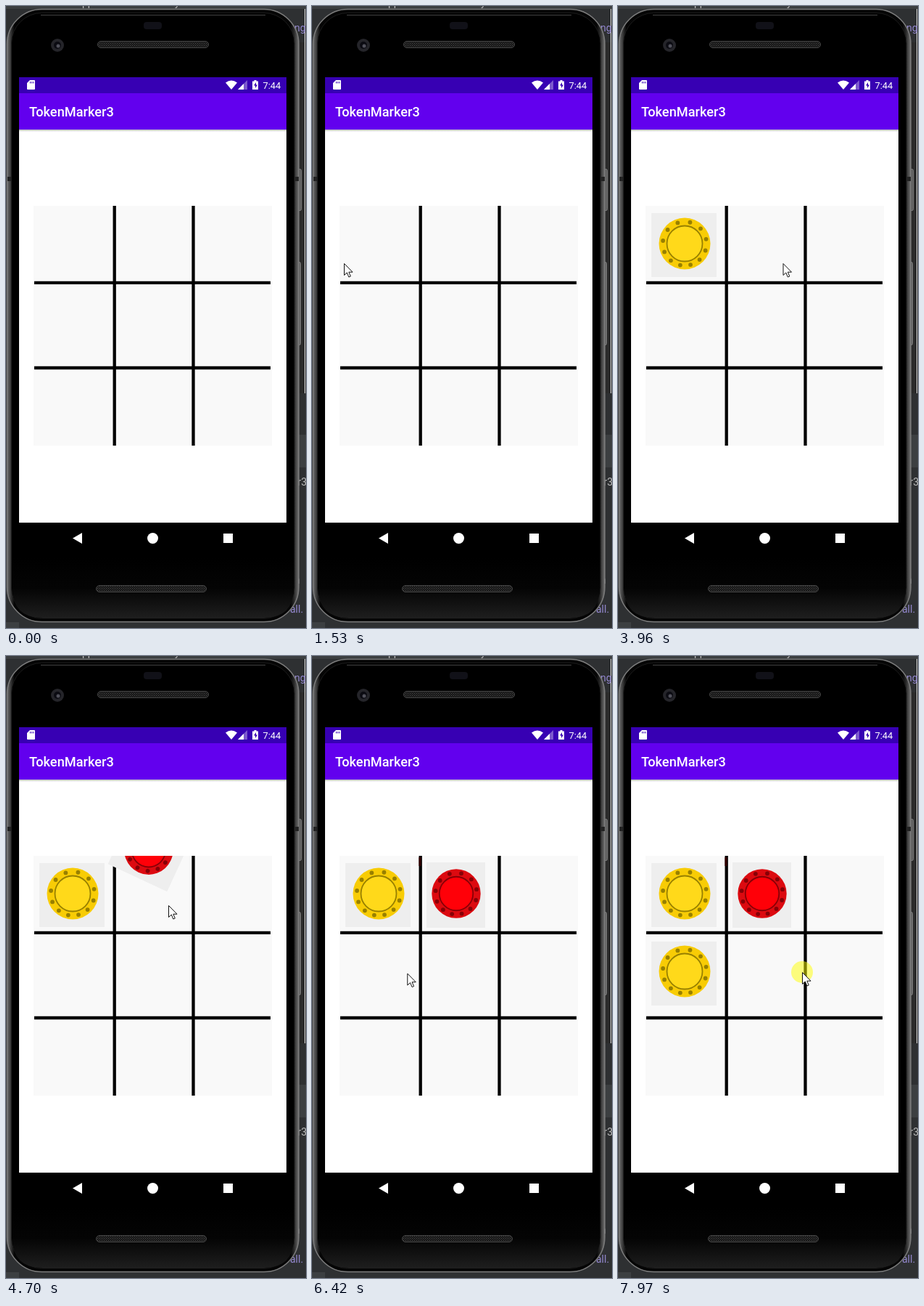
An HTML page for the animation above (8000 ms loop, 414 by 856 pixels).

```html
<!DOCTYPE html>
<html lang="en">
<head>
<meta charset="utf-8">
<title>Token game</title>
<style>
html, body { margin: 0; width: 100%; height: 100%; overflow: hidden; background: #2e3032; }
svg { display: block; width: 100%; height: 100%; }
text { font-family: Roboto, sans-serif; }
.code { font: 14px "Open Sans", sans-serif; }
</style>
</head>
<body>
<svg viewBox="0 0 414 856">
  <defs>
    <linearGradient id="rim" x2="1" y2="0">
      <stop offset="0" stop-color="#707070"/><stop offset=".008" stop-color="#4c4c4c"/>
      <stop offset=".016" stop-color="#2a2a2a"/><stop offset=".025" stop-color="#050505"/>
      <stop offset=".972" stop-color="#050505"/><stop offset=".984" stop-color="#2a2a2a"/>
      <stop offset=".992" stop-color="#4c4c4c"/><stop offset="1" stop-color="#707070"/>
    </linearGradient>
    <linearGradient id="chin" x2="0" y2="1">
      <stop offset="0" stop-color="#000"/><stop offset=".5" stop-color="#040404"/><stop offset="1" stop-color="#1e1e1e"/>
    </linearGradient>
    <linearGradient id="shade" x2="0" y2="1">
      <stop offset="0" stop-color="#b5b5b5"/><stop offset="1" stop-color="#fff"/>
    </linearGradient>
    <pattern id="mesh" width="3" height="3" patternUnits="userSpaceOnUse">
      <path d="M0 0h3v3H0z" fill="#151515"/><path d="M0 0h1v1H0zM1.5 1.5h1v1h-1z" fill="#4a4a4a"/>
    </pattern>
    <clipPath id="clip"><path d="M38 275h329v330H38z"/></clipPath>
  </defs>

  <!-- editor behind the phone -->
  <path d="M0 0h414v4H0zM400 590h14v45h-14z" fill="#3c3f41"/>
  <path d="M400 50h14v483h-14z" fill="#2b2b2b"/>
  <path d="M0 848h18v8H0z" fill="#3c3f41"/>
  <path d="M412.5 4v529" stroke="#ddd"/>
  <g class="code" fill="#bbb">
    <text x="105" y="0">pp</text><text x="233" y="0">y</text>
    <text x="398" y="35" fill="#9488d0">ng</text>
    <text x="395" y="660">er3</text>
    <text x="398" y="795">n</text>
    <text x="392" y="835" fill="#9488d0">all.</text>
  </g>

  <!-- phone -->
  <g fill="#5c5c5c" stroke="#808080">
    <rect x="400.5" y="224.500" width="7" height="57" rx="2"/>
    <rect x="400.5" y="352.500" width="6" height="114" rx="2"/>
  </g>
  <rect x="1.5" y="4.500" width="402.500" height="843" rx="48" fill="url(#rim)" stroke="#7c7c7c" stroke-width="1.500"/>
  <rect x="7.500" y="9.500" width="390.500" height="833" rx="42" fill="#000" stroke="#1c1c1c"/>
  <path d="M9 760H397V801Q397 842 356 842H50Q9 842 9 801Z" fill="url(#chin)"/>
  <path d="M48 12.500H358" stroke="#444"/>
  <path d="M2 238h5M399 238h5" stroke="#222" stroke-width="6"/>
  <rect x="190" y="22" width="25" height="10" rx="4" fill="#111118"/>
  <circle cx="71" cy="54" r="9" fill="#25252a"/>
  <circle cx="71" cy="54" r="5" fill="#0b0b12"/><circle cx="72" cy="55" r="2.5" fill="#50505a"/>
  <g fill="url(#mesh)" stroke="#444">
    <rect x="126.5" y="48.5" width="153" height="9" rx="4.5"/>
    <rect x="124.5" y="797.5" width="152" height="9" rx="4.5"/>
  </g>

  <!-- screen -->
  <path d="M18 98h369v613H18z" fill="#fff"/>
  <path d="M18 98h369v22H18z" fill="#3700b3"/>
  <path d="M18 120h369v50H18z" fill="#6200ee"/>
  <path d="M18 170h369v3H18z" fill="url(#shade)"/>
  <g fill="#fff">
    <path d="M33 102h6q1 0 1 1v11q0 1-1 1h-9q-1 0-1-1v-8z"/>
    <path d="M33.5 104v2.5M35.7 104v2.5M37.9 104v2.5" stroke="#3700b3"/>
    <path d="M303 105.5Q311 99.5 319 105.5L311 115Z"/>
    <path d="M333 102v13h-13z" opacity=".35"/><path d="M328 107v8h-8z"/>
    <path d="M342.5 102h3v1.5h2.5v11.5h-8v-11.500h2.5z"/>
    <path d="M345 105l-3 4.500h2v3.500l3-4.500h-2z" fill="#3700b3"/>
    <text x="354.5" y="114" font-size="12.8">7:44</text>
    <text x="32" y="152" font-size="18.2" font-weight="500">TokenMarker3</text>
    <path d="M92 732.5l13-7.5v15z"/><circle cx="202.5" cy="732.5" r="7.5"/><path d="M300 726h13v13h-13z"/>
  </g>
  <path d="M38 275h329v330H38z" fill="#f9f9f9"/>
  <path d="M149.7 275v330M258.5 275v330M39 380.800H365M39 498H365" stroke="#000" stroke-width="4.3"/>
  <path id="mark" d="M149 277v12" stroke="#300" stroke-width="3"/>
  <g id="chips" clip-path="url(#clip)"></g>
  <g id="cursor">
    <circle id="click" r="15" fill="#ff0" fill-opacity=".5"/>
    <path d="M.5 .5V16.5L4.3 13L6.8 19L9.3 18L6.8 12.2H12Z" fill="#fff" stroke="#111"/>
  </g>
</svg>
<script>
const LOOP = 8000, STEP = 70, DROP = 512.5, SPIN = 3600, FALL = 300;
const get = id => document.getElementById(id);
const yellow = ['#f8cc05', '#ffd91a', '#988000'], red = ['#dc0a10', '#ff0008', '#870006'];

// x, y: resting centre; left: ms of falling remaining when first seen
const chips = [
  { x: 91, y: 329, w: 90, h: 88, dx: 1, dy: -2, r: 35.5, colors: yellow, start: 3000, left: 50, step: 90 },
  { x: 198.5, y: 329, w: 81, h: 90, dx: .5, dy: -2, r: 33.7, colors: red, start: 4700, left: 67, step: STEP },
  { x: 91, y: 437, w: 90, h: 88, dx: 1, dy: -3, r: 35.5, colors: yellow, start: 7160, left: 100, step: STEP }
];

function chipArt({ w, h, dx, dy, r, colors: [rim, face, dark] }) {
  let dots = '';
  for (let i = 0; i < 12; i++) {
    // the dots are spaced a little unevenly
    const even = (i * 30 + 13) * Math.PI / 180, a = even + .096 * Math.cos(even);
    dots += `<circle cx="${r * .85 * Math.cos(a)}" cy="${r * .85 * Math.sin(a)}" r="2.9" fill="${dark}"/>`;
  }
  return `<rect x="${-w / 2}" y="${-h / 2}" width="${w}" height="${h}" fill="#eee"/>
    <g transform="translate(${dx} ${dy})"><circle r="${r}" fill="${rim}"/>${dots}
    <circle r="${r * .69}" fill="${face}" stroke="${dark}" stroke-width="1.8"/></g>`;
}
get('chips').innerHTML = chips.map(c => `<g>${chipArt(c)}</g>`).join('');
chips.forEach((c, i) => c.node = get('chips').children[i]);

// start time, number of steps, end position
const moves = [
  [370, 1, 368, 780], [440, 3, 238, 265], [850, 6, 44, 354], [2130, 3, 72, 339],
  [3550, 3, 231, 365], [3960, 2, 224, 343], [5230, 7, 223, 449], [5720, 2, 212, 459],
  [5860, 3, 175, 446], [6070, 7, 124, 435], [7630, 2, 254, 435]
];
const clicks = [1330, 2550, 4230, 6760, 7970];

function cursorAt(t) {
  let x = 368, y = 780;
  for (const [start, steps, toX, toY] of moves) {
    if (t < start) break;
    const p = Math.min(1, (Math.floor((t - start) / STEP) + 1) / steps);
    x += (toX - x) * p;
    y += (toY - y) * p;
  }
  return [x, y];
}

const show = (node, on) => node.style.display = on ? '' : 'none';

function draw(now) {
  const t = now % LOOP;
  for (const c of chips) {
    const age = t - c.start;
    show(c.node, age >= 0);
    const left = Math.max(0, c.left - Math.floor(age / c.step) * c.step);
    const rest = (1 - Math.cos(Math.PI * Math.min(1, left / FALL))) / 2;
    c.node.setAttribute('transform', `translate(${c.x} ${c.y - DROP * rest}) rotate(${-SPIN * rest})`);
  }
  show(get('mark'), t >= 4770);
  show(get('cursor'), t >= 370);
  show(get('click'), clicks.some(s => t >= s && t < s + 200));
  get('cursor').setAttribute('transform', `translate(${cursorAt(t)})`);
  requestAnimationFrame(() => draw(performance.now()));
}
draw(0);
</script>
</body>
</html>
```
